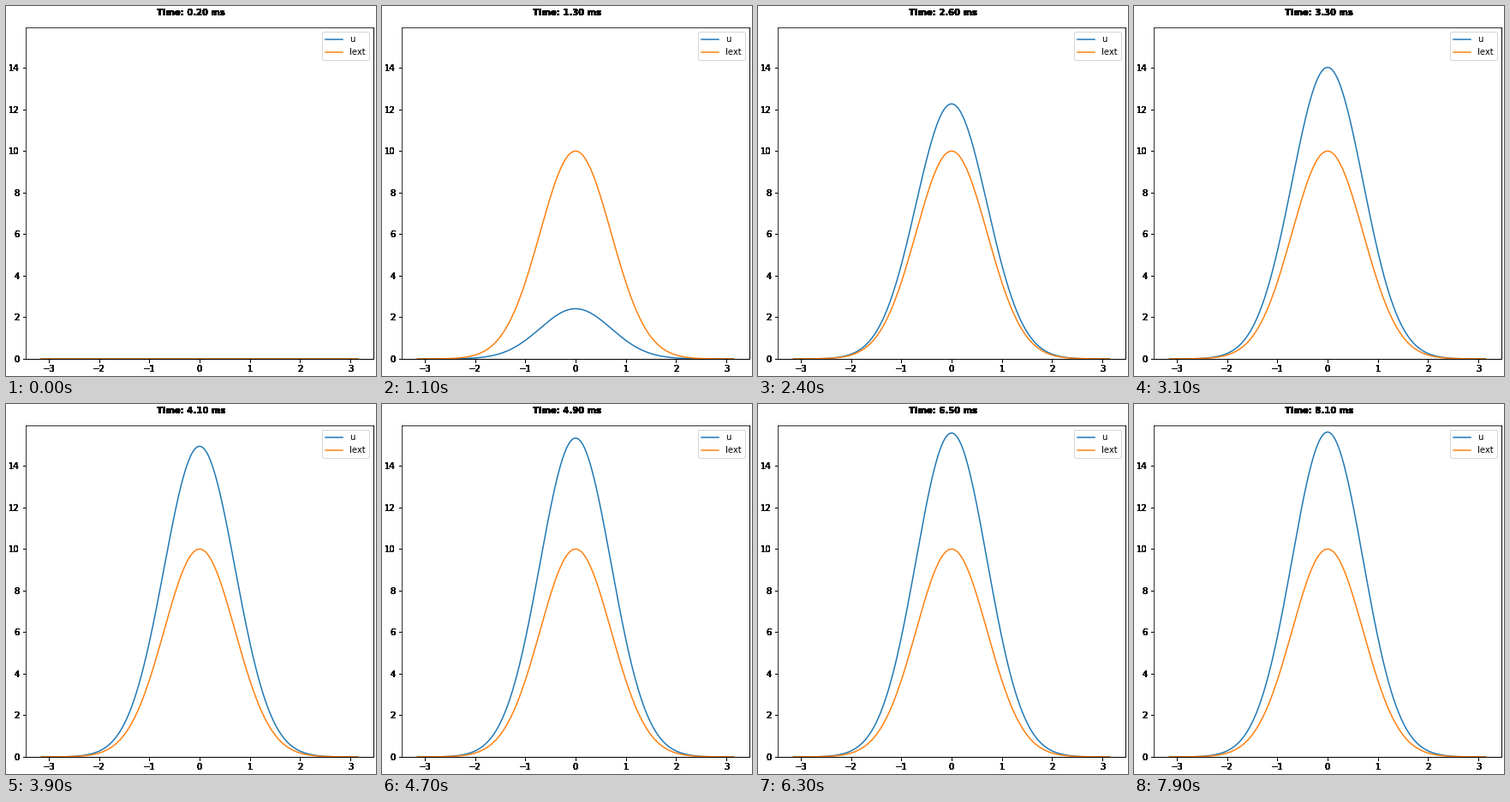
Write a matplotlib script that moves like this. It is 432x432 px and loops after 8 s.

```python
import numpy as np
import matplotlib.pyplot as plt
from matplotlib.animation import FuncAnimation

SIZE, DPI = 432, 72
FRAMES, INTERVAL = 80, 100
DT, ONSET = 0.1, 9           # Euler step, frame at which the stimulus starts
N, A, WIDTH, J0, K = 512, 10.0, 0.5, 1.0, 0.1

plt.rcParams["font.family"] = "DejaVu Sans"
plt.rcParams["font.size"] = 10


def ring(d):
    """Wrap a distance onto (-pi, pi]."""
    d = np.remainder(d, 2 * np.pi)
    return np.where(d > np.pi, d - 2 * np.pi, d)


def simulate():
    """Ring attractor network driven by a bump at 0, from rest."""
    dist = ring(x[:, None] - x[None, :])
    conn = J0 * np.exp(-0.5 * (dist / WIDTH) ** 2) / (np.sqrt(2 * np.pi) * WIDTH)
    u = np.zeros(N)
    states = []
    for i in range(FRAMES):
        states.append(u)
        if i >= ONSET:
            rate = u ** 2 / (1 + K * np.sum(u ** 2))
            u = u + DT * (-u + conn @ rate + stimulus)
    return states


def ink(artist, passes=12):
    """Draw an artist repeatedly so its soft edges turn solid."""
    draw = artist.draw

    def repeat(renderer):
        for _ in range(passes):
            draw(renderer)

    artist.draw = repeat


x = np.linspace(-np.pi, np.pi, N)
stimulus = A * np.exp(-0.25 * (ring(x) / WIDTH) ** 2)
rest = np.zeros(N)
states = simulate()

fig = plt.figure(figsize=(SIZE / DPI, SIZE / DPI), dpi=DPI, facecolor="white")
left, right, top, bottom = 23, 429, 25, 412
ax = fig.add_axes([left / SIZE, 1 - bottom / SIZE,
                   (right - left) / SIZE, (bottom - top) / SIZE])
u_line, = ax.plot(x, rest, label="u")
ext_line, = ax.plot(x, rest, label="Iext")
ax.legend(loc="upper right")
ax.set_xticks(range(-3, 4))
ax.set_yticks(range(0, 15, 2))
ax.set_xlim(-1.1 * np.pi, 1.1 * np.pi)
ax.set_ylim(0, 15.95)

title = fig.text(0.5, 1 - 3 / SIZE, "", ha="center", va="top",
                 fontsize=10, fontweight="bold")

ink(title)
for tick in ax.xaxis.get_major_ticks() + ax.yaxis.get_major_ticks():
    ink(tick.label1)
    ink(tick.tick1line)
for side in ("right", "bottom"):
    ink(ax.spines[side])


def update(i):
    u_line.set_ydata(states[i])
    ext_line.set_ydata(stimulus if i >= ONSET else rest)
    title.set_text(f"Time: {(i + 2) * DT:.2f} ms")
    return u_line, ext_line, title


anim = FuncAnimation(fig, update, frames=FRAMES, interval=INTERVAL,
                     repeat=True, repeat_delay=0, blit=False)
plt.show()
```
